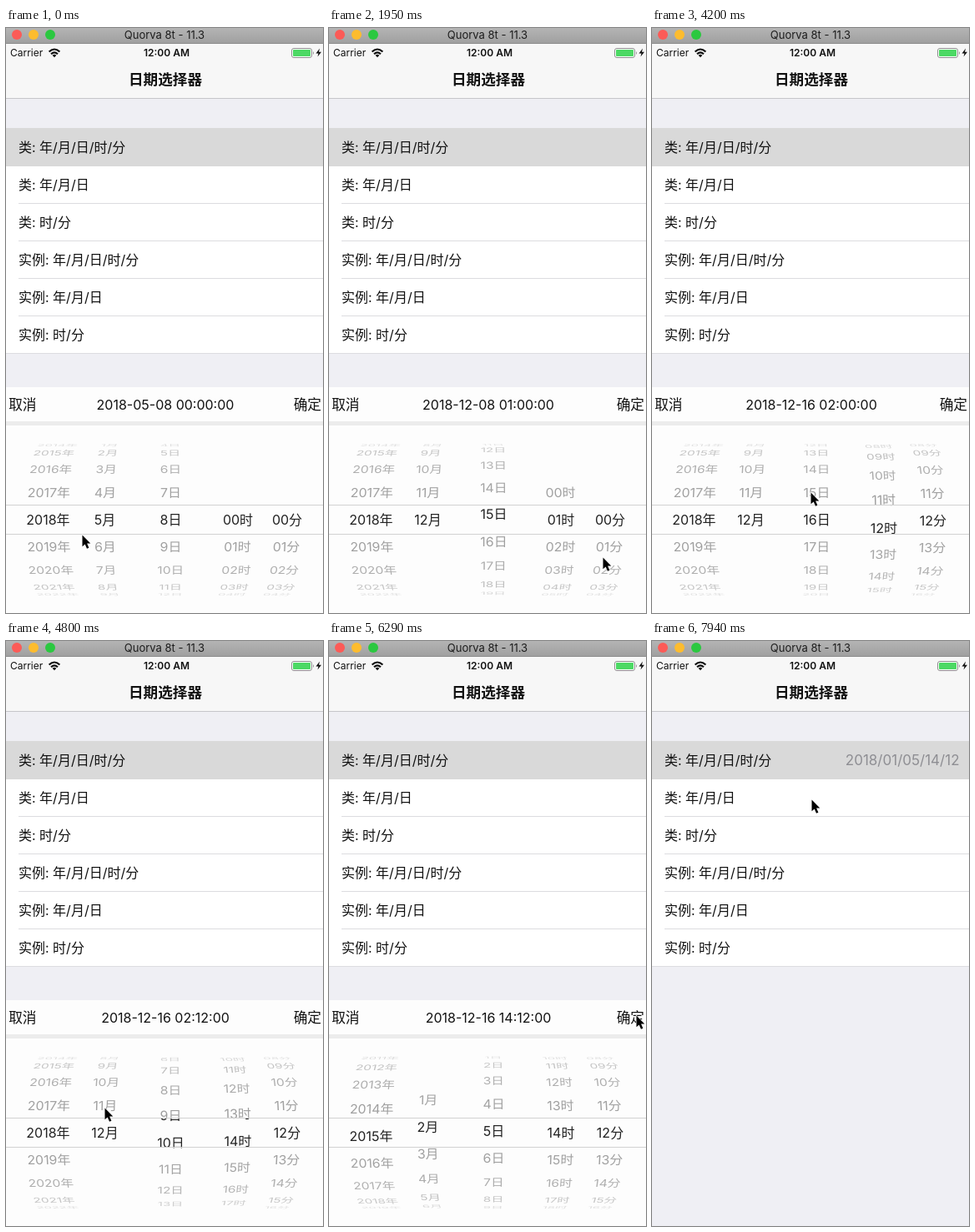
An HTML page for the animation above (8000 ms loop, 380 by 702 pixels).

```html
<!DOCTYPE html>
<html lang="zh-CN">
<head>
<meta charset="utf-8">
<title>日期选择器</title>
<style>
html, body { margin: 0; width: 100%; height: 100%; overflow: hidden; }
body {
  position: relative; background: #efeff4; color: #111;
  font: 16px/20px Inter, "Noto Sans CJK SC", "Noto Sans CJK", sans-serif;
}
div, svg { position: absolute; white-space: nowrap; }
#bar {
  left: 0; top: 0; width: 380px; height: 18px; border-bottom: 1px solid #8c8c8c;
  background: linear-gradient(#b4b4b4, #a0a0a0);
  font-size: 13px; line-height: 17px; text-align: center; color: #1c1c1c;
}
#bar i { position: absolute; top: 2px; width: 12px; height: 12px; border-radius: 50%; }
#nav { left: 0; top: 19px; width: 380px; height: 65px; background: #f7f7f7; border-bottom: 1px solid #c6c6ca; }
#nav .mid { width: 380px; text-align: center; }
#list { left: 0; top: 120px; width: 380px; height: 270px; background: #fff; border-bottom: 1px solid #dcdce0; }
#list .cell { left: 0; width: 380px; height: 45px; line-height: 46px; text-indent: 15px; }
#list .cell + .cell + .cell::before {
  content: ""; position: absolute; left: 15px; right: 0; top: 0; height: 1px; background: #dcdce0;
}
#list .cell:first-child { height: 46px; background: #d9d9d9; }
#detail { right: 11.5px; top: 13px; font-size: 17px; color: #8e8e93; }
#sheet { left: 0; top: 431px; width: 380px; height: 271px; background: #fdfdfd; }
#sheet .btn { top: 11px; font-size: 16.7px; }
#date { top: 11px; width: 382px; text-align: center; }
#rule { top: 41px; width: 380px; height: 5px; background: #ececec; }
.layer { left: 0; width: 380px; overflow: hidden; }
#far { top: 67px; height: 184px; color: #9c9c9c; }
#near { top: 141px; height: 34px; background: #fdfdfd; color: #222; border: solid #d2d2d2; border-width: 1px 0; }
.layer div { left: -40px; top: -10px; width: 80px; height: 20px; text-align: center; }
</style>
</head>
<body>
<div id="bar">
  <i style="left:7px;background:#fc5b57"></i><i style="left:27px;background:#fdbc2e"></i><i style="left:47px;background:#2bc840"></i>
  Quorva 8t - 11.3
</div>
<div id="nav">
  <div style="left:5px;top:1px;font-size:12px">Carrier</div>
  <div class="mid" style="left:2.5px;top:1px;font-size:12px;font-weight:600">12:00 AM</div>
  <div class="mid" style="left:1px;top:33px;font-size:17.6px;font-weight:600">日期选择器</div>
  <svg width="380" height="30" style="left:0;top:0">
    <g fill="none" stroke="#111" stroke-width="2.1">
      <path d="M51.6 9.6Q58 3.4 64.4 9.6"/><path d="M54 12.3Q58 8.6 62 12.3"/>
    </g>
    <path d="M55.6 13.7Q58 11.7 60.4 13.7L58 16.2Z" fill="#111"/>
    <rect x="342.5" y="5.5" width="24" height="11" rx="2.5" fill="#fff" stroke="#8f8f8f"/>
    <rect x="344" y="7" width="21" height="8" rx="1" fill="#4cd964"/>
    <path d="M368 9q2 2 0 4z" fill="#8f8f8f"/>
    <path d="M376 5.5L371.5 11.5H374.5L373.5 15.5L378 9.7H375Z" fill="#111"/>
  </svg>
</div>
<div id="list"></div>
<div id="sheet">
  <div class="btn" style="left:3.2px">取消</div>
  <div id="date"></div>
  <div class="btn" style="right:2px">确定</div>
  <div id="rule"></div>
  <div class="layer" id="far"></div>
  <div class="layer" id="near"></div>
</div>
<svg id="cursor" width="16" height="22" viewBox="-1 -1 16 22" style="left:-1px;top:-1px">
  <path d="M.5 .5V14.3L3.7 11.4L6 16.7L8.4 15.7L6.1 10.6H10.3Z" fill="#000" stroke="#fff" stroke-width="1.1" paint-order="stroke"/>
</svg>
<script>
const LOOP = 8000, STEP = 150, LATE = 6440, TAP = 6890;
const DRAG = 300, TRAVEL = 300;
const RADIUS = 90, ANGLE = 21.2 * Math.PI / 180, MID = 190, ROW = 32.5;
const $ = id => document.getElementById(id);
const clamp = (v, lo, hi) => Math.max(lo, Math.min(hi, v));
const mix = (a, b, p) => a + (b - a) * clamp(p, 0, 1);
const pad = n => String(n).padStart(2, "0");

function add(parent, text = "", cls = "") {
  const el = document.createElement("div");
  el.className = cls;
  el.textContent = text;
  return parent.appendChild(el);
}

const parts = ["年/月/日/时/分", "年/月/日", "时/分"];
["类", "实例"].flatMap(kind => parts.map(p => `${kind}: ${p}`))
  .forEach((s, i) => { add($("list"), s, "cell").style.top = i * 45 + "px"; });
const detail = add($("list"), "2018/01/05/14/12");
detail.id = "detail";

// x: column centre, grab: where the pointer takes hold
const wheels = [
  { x: 50.5, grab: 75, unit: "年", min: 1970, max: 2100, first: 2018 },
  { x: 118.5, grab: 118, unit: "月", min: 1, max: 12, first: 5 },
  { x: 197.5, grab: 190, unit: "日", min: 1, max: 31, first: 8 },
  { x: 278, grab: 275, unit: "时", min: 0, max: 23, first: 0, padded: true },
  { x: 337, grab: 328, unit: "分", min: 0, max: 59, first: 0, padded: true }
];

// Each flick: wheel, press time, pointer y, rows dragged, value and time at rest
const flicks = [
  [1, 300, 655, 3, 12, 1500],
  [2, 750, 640, 1.5, 16, 3250],
  [3, 1350, 632, .9, 1, 1800],
  [4, 2100, 635, 4, 12, 4800],
  [3, 2700, 635, .9, 2, 3150],
  [3, 3300, 606, 3.2, 14, 5700],
  [2, 4200, 557, -3, 5, 6853],
  [1, 4950, 560, -3, -2, 9475],
  [0, 5550, 590, -1.8, 2013, 8250]
].map(([w, at, y, rows, stop, rest]) => ({ w: wheels[w], at, y, rows, stop, rest }));

// The pointer follows the flicks, taps the button, then leaves for the list
const path = [[0, 91, 608]];
for (const f of flicks) path.push([f.at, f.w.grab, f.y], [f.at + DRAG, f.w.grab, f.y - f.rows * ROW]);
path.push([TAP, 368, 449], [7190, 368, 449], [7490, 315, 418], [7790, 185, 200], [7940, 191, 190]);

function pointer(t) {
  const i = path.findIndex(p => p[0] > t);
  if (i < 0) return path[path.length - 1].slice(1);
  const [t0, x0, y0] = path[i - 1], [t1, x1, y1] = path[i];
  const p = (t - t0) / Math.min(TRAVEL, t1 - t0);
  return [mix(x0, x1, p), mix(y0, y1, p)];
}

// Current value of a wheel and the last value it came to rest on
function spin(w, t) {
  let value = w.first, settled = w.first;
  for (const f of flicks) {
    if (f.w !== w || t < f.at) continue;
    const from = settled, let_go = f.at + DRAG, thrown = from + f.rows;
    const left = clamp((f.rest - t) / (f.rest - let_go), 0, 1);
    value = t < let_go ? mix(from, thrown, (t - f.at) / DRAG) : f.stop + (thrown - f.stop) * left ** 4;
    value = clamp(value, w.min, w.max);
    if (value === clamp(f.stop, w.min, w.max)) settled = value;
  }
  return { value, settled };
}

const makeRows = (layer, reach, mid) => Array.from({ length: reach * 2 + 1 },
  (_, i) => ({ el: add($(layer)), step: i - reach, mid, fade: layer === "far" }));
for (const w of wheels) w.rows = [...makeRows("far", 4, 92), ...makeRows("near", 1, 17)];

function turn(w, value) {
  for (const r of w.rows) {
    const n = Math.round(value) + r.step, phi = (n - value) * ANGLE;
    const show = n >= w.min && n <= w.max && Math.abs(phi) < 1.56;
    r.el.style.display = show ? "" : "none";
    if (!show) continue;
    const cos = Math.cos(phi), sx = 1 - .09 * (1 - cos), sy = .15 + .85 * cos;
    const skew = (MID - w.x) * .09 * Math.tan(phi) / RADIUS;
    const lean = clamp(skew, -.5, .5) * sy;
    const x = MID + (w.x - MID) * sx, y = r.mid + RADIUS * Math.sin(phi);
    r.el.textContent = (w.padded ? pad(n) : n) + w.unit;
    r.el.style.transform = `matrix(${sx},0,${lean},${sy},${x},${y})`;
    if (r.fade) r.el.style.opacity = .25 + .75 * cos;
  }
}

const easeInOut = p => p < .5 ? 4 * p ** 3 : 1 - 4 * (1 - p) ** 3;

function hold(t) {
  const base = t < LATE ? 0 : LATE;
  return base + Math.floor((t - base) / STEP) * STEP;
}

function draw(t) {
  const [year, month, day, hour, minute] = wheels.map(w => {
    const { value, settled } = spin(w, t);
    turn(w, value);
    return pad(settled);
  });
  $("date").textContent = `${year}-${month}-${day} ${hour}:${minute}:00`;
  detail.style.visibility = t >= TAP ? "visible" : "hidden";
  const gone = easeInOut(clamp((t - TAP + 35) / 400, 0, 1));
  $("sheet").style.transform = `translateY(${Math.round(gone * 272)}px)`;
  const [x, y] = pointer(t);
  $("cursor").style.transform = `translate(${x}px,${y}px)`;
}

const start = performance.now();
function tick() {
  draw(hold((performance.now() - start) % LOOP));
  requestAnimationFrame(tick);
}
tick();
</script>
</body>
</html>
```
